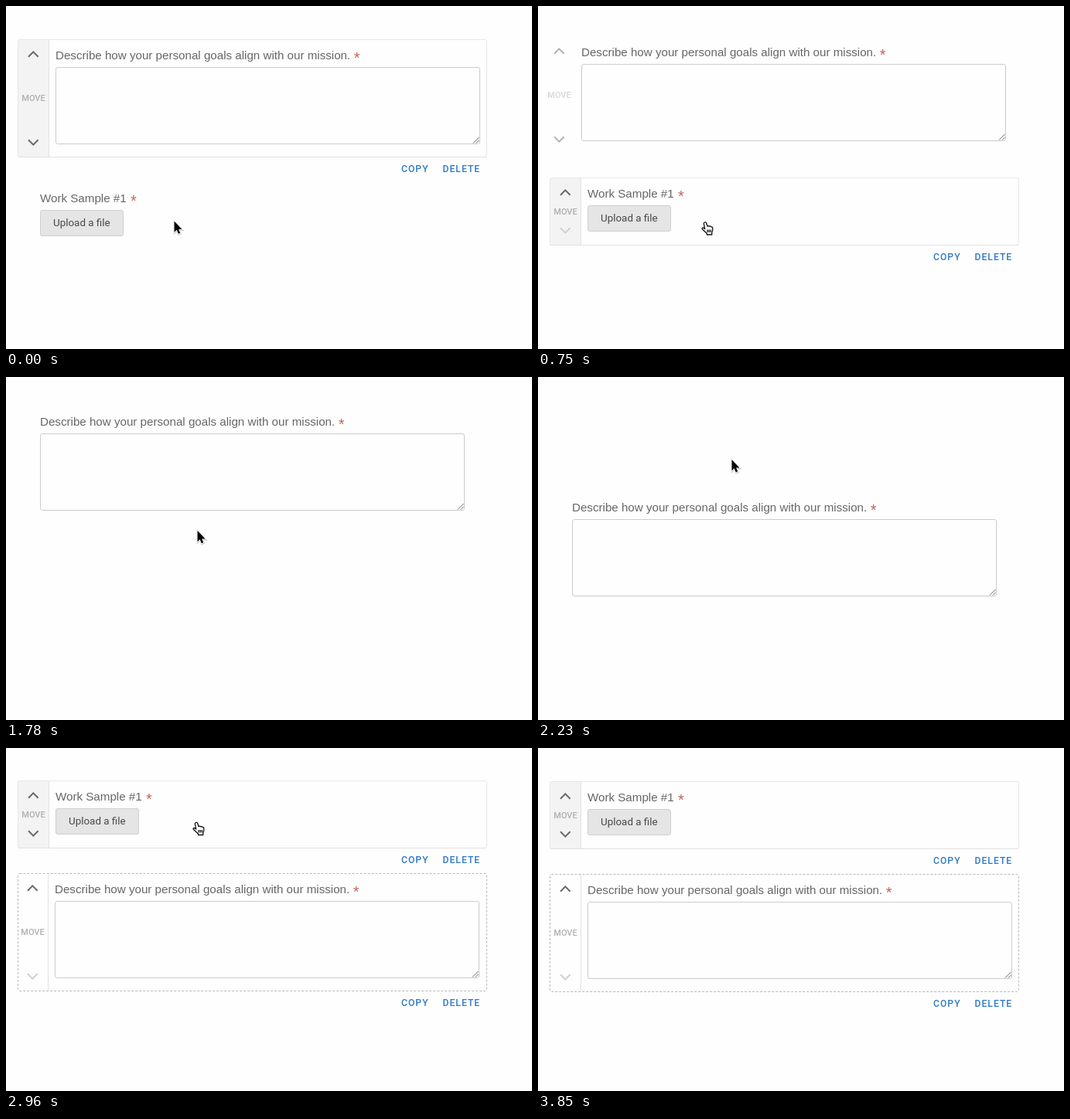
An HTML page that plays this animation: 680x444 px, repeating every 4.6 s.

```html
<!DOCTYPE html>
<html lang="en">
<head>
<meta charset="utf-8">
<title>Reorder form fields</title>
<style>
  html, body { margin: 0; height: 100%; overflow: hidden; background: #fefefe; }
  svg { display: block; width: 100vw; height: 100vh; font-family: Roboto, Arial, sans-serif; }
  .label, .star { font-family: "Liberation Sans", Arial, sans-serif; }
  .label { font-size: 15.15px; fill: #666; }
  .star { font-size: 20px; fill: #c0665a; }
  .upload { font-size: 13.4px; fill: #484848; }
  .move { font-size: 11px; font-weight: 500; fill: #b0b0b0; text-anchor: middle; }
  .pressed .move { fill: #c4c4c4; }
  .link { font-size: 12.2px; font-weight: 500; letter-spacing: 1px; fill: #2f7ac6; }
  .chevron { fill: none; stroke: #686868; stroke-width: 2; }
  .last .down { stroke: #d0d0d0; }
  .frame { fill: none; stroke: #e7e7e7; }
  .shade { stroke: #e0e0e0; }
  .column { fill: #f3f3f3; }
  .pressed .column { fill: #eee; }
  .edge { stroke: #e3e3e3; }
  .hover .frame { stroke: #b9b9b9; stroke-dasharray: 3 2; }
  .hover .column, .hover .shade { display: none; }
  .fade .box, .fade .links, .off .box, .off .links, .off .handle, .gone { display: none; }
  .fade .handle { opacity: .5; }
  .area { fill: #fefefe; stroke: #ccc; }
  .grip { stroke: #666; }
  .button { fill: #e5e5e5; stroke: #cfcfcf; }
</style>
</head>
<body>
<svg viewBox="0 0 680 444">
  <g id="cards"></g>
  <g id="arrow">
    <path d="M0 0V14.3L3.2 11.3L5.3 16.3L7.7 15.3L5.6 10.4H10Z" stroke="#ccc" stroke-width="2.4" transform="translate(.4 .8)"/>
    <path d="M0 0V14.3L3.2 11.3L5.3 16.3L7.7 15.3L5.6 10.4H10Z" stroke="#fff" stroke-width="1.4" paint-order="stroke"/>
  </g>
  <g id="hand" fill="#fff" stroke="#111" stroke-width="1.3" stroke-linejoin="round">
    <path d="M4 1.2C5.2 .3 6.4 1 6.8 2.2L8 6.2C9 5.4 10 5.6 10.4 6.4C11.4 5.8 12.4 6.2 12.8 7C14 6.6 14.8 7.4 14.8 8.6C15 11 14.6 12.6 13.8 14.2V17H7.4V15.4C5.6 14.2 3.4 11.6 1.4 9.8C.6 8.6 1.8 7.6 3 8.2L4.8 9.6L3.4 3.2C3.2 2.2 3.4 1.6 4 1.2Z"/>
    <path d="M8.1 10.6V14M10.2 10.6V14M12.3 10.6V14"/>
  </g>
</svg>
<script>
const $ = id => document.getElementById(id);
const LOOP = 4600;

const text = (cls, x, y, str) => `<text class="${cls}" x="${x}" y="${y}">${str}</text>`;

// Cards are drawn with their top at y = 0; content and handle slide sideways.
function makeCard(h, title, starX, field) {
  const g = document.createElementNS("http://www.w3.org/2000/svg", "g");
  g.innerHTML = `
    <g class="box">
      <rect class="column" x="16" y="1" width="39" height="${h - 1}"/>
      <rect class="frame" x="15.5" y=".5" width="606" height="${h}" rx="2"/>
      <path class="shade" d="M16 ${h + .5}H621"/>
    </g>
    <g class="slide">
      <g class="handle">
        <path class="edge box" d="M55.5 1V${h}"/>
        <path class="chevron" d="M29 22.7L35.3 16.4L41.6 22.7"/>
        <path class="chevron down" d="M29 ${h - 21.7}L35.3 ${h - 15.4}L41.6 ${h - 21.7}"/>
        ${text("move", 35.5, h / 2 + 4.3, "MOVE")}
      </g>
      ${text("label", 64, 26, title)}${text("star", starX, 30.5, "*")}${field}
    </g>
    <g class="links">${text("link", 511, h + 19.8, "COPY")}${text("link", 564.5, h + 19.8, "DELETE")}</g>`;
  $("cards").append(g);
  return g;
}

const essay = makeCard(152, "Describe how your personal goals align with our mission.", 449.7,
  `<rect class="area" x="64.5" y="36.5" width="548" height="99" rx="2.5"/>
   <path class="grip" d="M604 134.5L611.5 127M608 134.5L611.5 131"/>`);
const sample = makeCard(87, "Work Sample #1", 181,
  `<rect class="button" x="64.5" y="36.5" width="107" height="33" rx="2.5"/>` +
  text("upload", 81, 57, "Upload a file"));

// Each track lists [start ms, ...values], held until the next entry.
const essayTrack = [
  [0, "on", 20, 43], [750, "fade", 12, 39], [900, "off", 2, 37], [1040, "off", 0, 37],
  [2230, "off", 0, 148], [2370, "off", 0, 157],
  [2820, "hover last", 11, 157], [2960, "hover last", 19, 162], [3110, "hover last", 20, 163]
];
const sampleTrack = [
  [0, "off", 0, 228], [600, "hover last", 18, 228], [750, "on last", 20, 222],
  [1040, "on last pressed", 20, 222], [1780, "gone", 20, 222],
  [2820, "on", 20, 37], [2960, "on", 20, 42], [3110, "on", 20, 43]
];
const cursorTrack = [
  [0, "arrow", 217.5, 278.5], [450, "hand", 211, 279], [1040, "hand", 219, 278], [1190, "hand", 243, 266.5],
  [1630, "arrow", 245.5, 264.5], [1780, "arrow", 247.5, 199], [1930, "arrow", 247.5, 148],
  [2080, "arrow", 250.5, 111], [2230, "arrow", 250.5, 107], [2520, "arrow", 247.5, 103],
  [2670, "arrow", 245.5, 96], [2960, "hand", 241, 95.5], [3710, "hand", 276, 92], [3850, "none", 0, 0]
];

const at = (track, t) => track.findLast(step => step[0] <= t);

function pose(card, [, mode, dx, y]) {
  card.setAttribute("class", mode);
  card.setAttribute("transform", `translate(0 ${y})`);
  card.querySelector(".slide").setAttribute("transform", `translate(${dx - 20} 0)`);
}

function draw(now) {
  const t = now % LOOP;
  pose(essay, at(essayTrack, t));
  pose(sample, at(sampleTrack, t));
  const [, shape, x, y] = at(cursorTrack, t);
  for (const id of ["arrow", "hand"]) {
    $(id).setAttribute("display", id === shape ? "inline" : "none");
    $(id).setAttribute("transform", `translate(${x} ${y})`);
  }
}

const start = performance.now();
function tick() {
  draw(performance.now() - start);
  requestAnimationFrame(tick);
}
tick();
</script>
</body>
</html>
```
